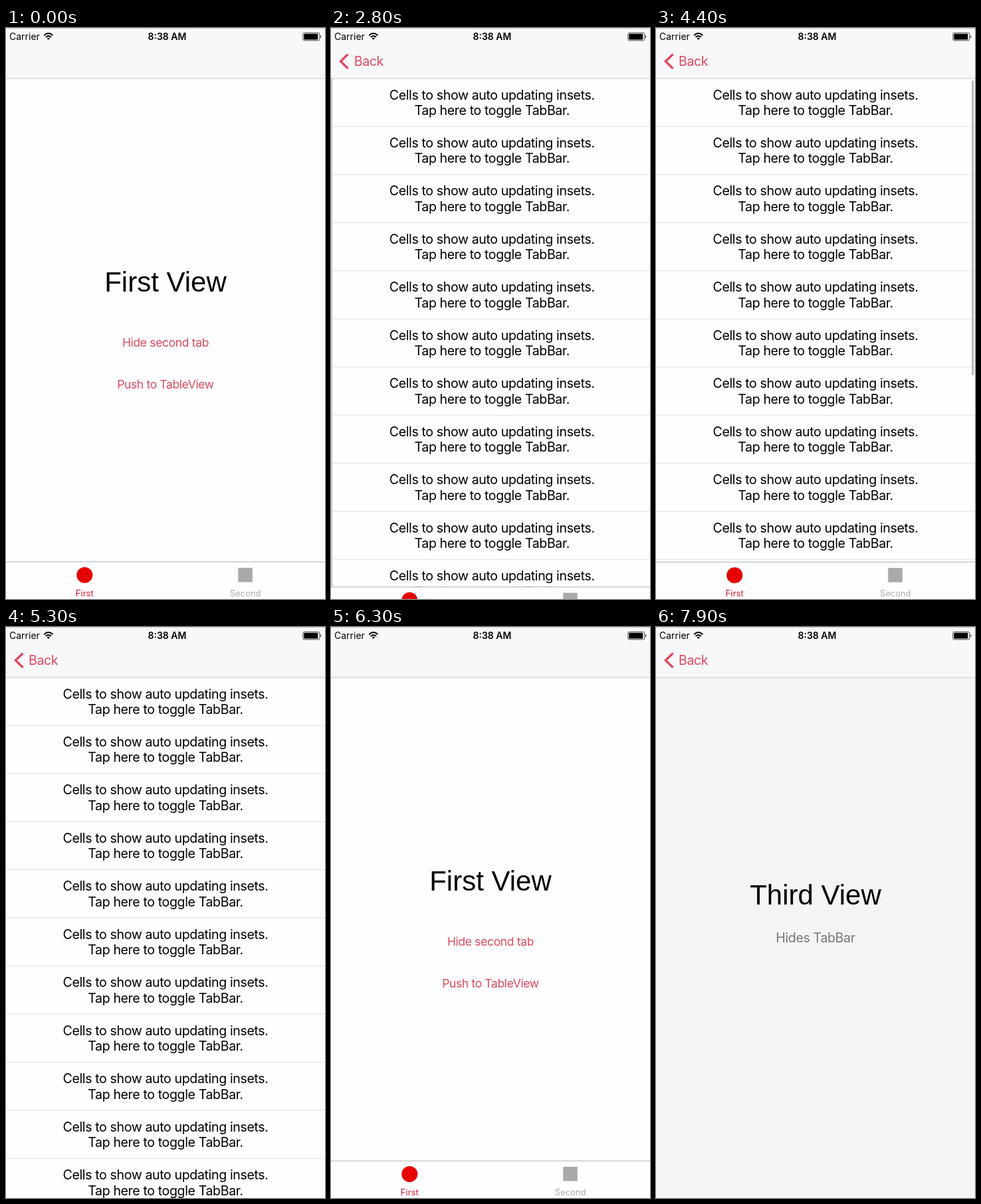
Recreate the animation shown at these times as an HTML page. Size 480 px wide and 860 px high, loop 8 s.

```html
<!DOCTYPE html>
<html lang="en">
<head>
<meta charset="utf-8">
<title>Tab bar demo</title>
<style>
  html, body { margin: 0; width: 100%; height: 100%; overflow: hidden; background: #fefdff; }
  svg { display: block; width: 100%; height: 100%; }
  text { font-family: Inter, Roboto, sans-serif; font-size: 19.6px; letter-spacing: -.02em; }
  .mid { text-anchor: middle; }
  .title { font: 42px "Liberation Sans", Arial, sans-serif; letter-spacing: 0; text-anchor: middle; }
  .button { font-size: 17.5px; fill: #d84b5c; text-anchor: middle; }
  .status { font-size: 14px; letter-spacing: 0; }
  .label { font-size: 12.6px; letter-spacing: .2px; text-anchor: middle; }
</style>
</head>
<body>
<svg viewBox="0 0 480 860">
  <defs>
    <linearGradient id="edge">
      <stop offset="0" stop-opacity="0"/>
      <stop offset="1" stop-opacity=".16"/>
    </linearGradient>
  </defs>

  <g id="first">
    <rect width="480" height="860" fill="#fefdff"/>
    <text class="title" x="240" y="397">First View</text>
    <text class="button" id="hideTab" x="240" y="479.5">Hide second tab</text>
    <text class="button" id="showTab" x="240" y="479.5"></text>
    <text class="button" id="pushTable" x="240" y="542.5">Push to TableView</text>
  </g>
  <g id="second">
    <rect width="480" height="860" fill="#f4f3f6"/>
    <text class="title" x="240" y="397">Second View</text>
    <text class="button" x="240" y="479.5">Hide TabBar</text>
    <text class="button" id="pushThird" x="240" y="545.5">Push to Third</text>
  </g>
  <rect id="dim" width="480" height="860"/>

  <g id="table">
    <rect x="-8" width="8" height="860" fill="url(#edge)"/>
    <rect width="480" height="860" fill="#fefdff"/>
    <g id="rows"></g>
    <rect id="scroller" x="475" y="79" width="3.5" height="444" rx="1.75" fill="#bdbcbf"/>
  </g>
  <g id="third">
    <rect x="-8" width="8" height="860" fill="url(#edge)"/>
    <rect width="480" height="860" fill="#f4f3f6"/>
    <text class="title" x="240" y="418">Third View</text>
    <text class="mid" x="240" y="475" fill="#77767a">Hides TabBar</text>
  </g>

  <g id="tabBar">
    <rect y="804" width="480" height="57" fill="#fefdff"/>
    <rect y="803.5" width="480" height="1.2" fill="#bebdc1"/>
    <g id="firstTab">
      <circle cy="824" r="12"/>
      <text class="label" y="855.5">First</text>
    </g>
    <g id="secondTab" transform="translate(360.3 0)">
      <rect x="-11" y="813" width="21.5" height="21.5"/>
      <text class="label" y="855.5">Second</text>
    </g>
  </g>

  <rect width="480" height="76" fill="#f8f7fa"/>
  <rect y="75.5" width="480" height="1.2" fill="#cfced2"/>
  <rect width="480" height="1" fill="#c5c4c8"/>
  <path id="chevron" d="M25.5 39.5 L14.5 50.3 L25.5 61" fill="none" stroke="#e0485c" stroke-width="3.4"/>
  <text id="back" y="57" fill="#e0485c">Back</text>

  <text class="status" x="5" y="18">Carrier</text>
  <g fill="none" stroke="#000" stroke-width="1.9">
    <path d="M57.2 11.2 Q63.8 5 70.4 11.2"/>
    <path d="M59.7 13.8 Q63.8 10 67.9 13.8"/>
  </g>
  <path d="M61.6 15.6 Q63.8 13.6 66 15.6 L63.8 18 Z"/>
  <text class="status mid" x="242.5" y="18" font-weight="600">8:38 AM</text>
  <rect x="446.8" y="7.3" width="25" height="11.6" rx="2" fill="none" stroke="#333" stroke-width=".9"/>
  <rect x="448.3" y="8.7" width="21" height="8.8" rx=".8"/>
  <path d="M473.2 10.8 Q475.4 13 473.2 15.4 Z"/>
</svg>

<script>
const LOOP = 8000, WIDTH = 480, BAR_HEIGHT = 56, ROW = 72.45;
const RED = '#e60000', LABEL_RED = '#cf1226', GRAY = '#a9a8aa';
const el = id => document.getElementById(id);

el('rows').innerHTML = Array.from({ length: 11 }, (_, i) => {
  const y = 76 + i * ROW;
  return `<text class="mid" x="240" y="${y + 31.5}">Cells to show auto updating insets.</text>
    <text class="mid" x="240" y="${y + 55}">Tap here to toggle TabBar.</text>
    <rect y="${y + 71.7}" width="480" height="1.1" fill="#e2e1e6"/>`;
}).join('');

// Critically damped approach from 0 to 1.
function settle(t, start) {
  const x = Math.max(0, t - start) * 0.015;
  return x > 8 ? 1 : 1 - (1 + x) * Math.exp(-x);
}

const ramp = (t, from, to) => Math.min(1, Math.max(0, (t - from) / (to - from)));
const move = (node, x, y = 0) => node.setAttribute('transform', `translate(${x} ${y})`);
const show = (node, visible) => node.setAttribute('display', visible ? 'inline' : 'none');
const fade = (id, opacity) => el(id).setAttribute('opacity', opacity);

function paintTab(tab, selected) {
  tab.firstElementChild.setAttribute('fill', selected ? RED : GRAY);
  tab.lastElementChild.setAttribute('fill', selected ? LABEL_RED : GRAY);
}

function slideIn(id, cover) {
  show(el(id), cover > 0);
  move(el(id), WIDTH * (1 - cover));
}

function render(t) {
  const tableCover = settle(t, 2300) - settle(t, 5305);
  const thirdCover = settle(t, 7345);
  const cover = tableCover + thirdCover;
  const onSecond = t >= 6500;

  for (const id of ['first', 'second']) {
    show(el(id), (id === 'second') === onSecond);
    move(el(id), -0.3 * WIDTH * cover);
  }
  fade('dim', 0.1 * cover);
  slideIn('table', tableCover);
  slideIn('third', thirdCover);

  // Button titles and highlights
  fade('hideTab', 1 - ramp(t, 1250, 1420) + ramp(t, 1840, 2100));
  fade('showTab', ramp(t, 1420, 1580) - 0.85 * ramp(t, 1650, 1780) - 0.15 * ramp(t, 1810, 1870));
  const truncated = t >= 1700;
  el('showTab').textContent = truncated ? 'Show...ond tab' : 'Show second tab';
  el('showTab').setAttribute('x', truncated ? 238 : 240);
  fade('pushTable', t >= 2200 && t < 2800 ? 0.25 : 1);
  fade('pushThird', t >= 7300 ? 0.22 : 1);
  fade('scroller', ramp(t, 3950, 4200) - ramp(t, 4500, 4800));

  // Tab bar
  const barDown = settle(t, 2650) - settle(t, 3900) + settle(t, 4500)
    - settle(t, 5380) + settle(t, 7378);
  move(el('tabBar'), 0, (BAR_HEIGHT + 1) * barDown);
  const single = t >= 1400 && t < 1720;
  move(el('firstTab'), single ? 240 : 118.3);
  show(el('secondTab'), !single);
  paintTab(el('firstTab'), !onSecond);
  paintTab(el('secondTab'), onSecond);

  // Back button
  const travel = t > 5300 && t < 7000 ? 151 : 169;
  el('back').setAttribute('x', 34 + travel * (1 - cover));
  fade('back', cover ** 1.3);
  fade('chevron', cover ** 3);
}

const began = performance.now();
function frame() {
  render((performance.now() - began) % LOOP);
  requestAnimationFrame(frame);
}
frame();
</script>
</body>
</html>
```
